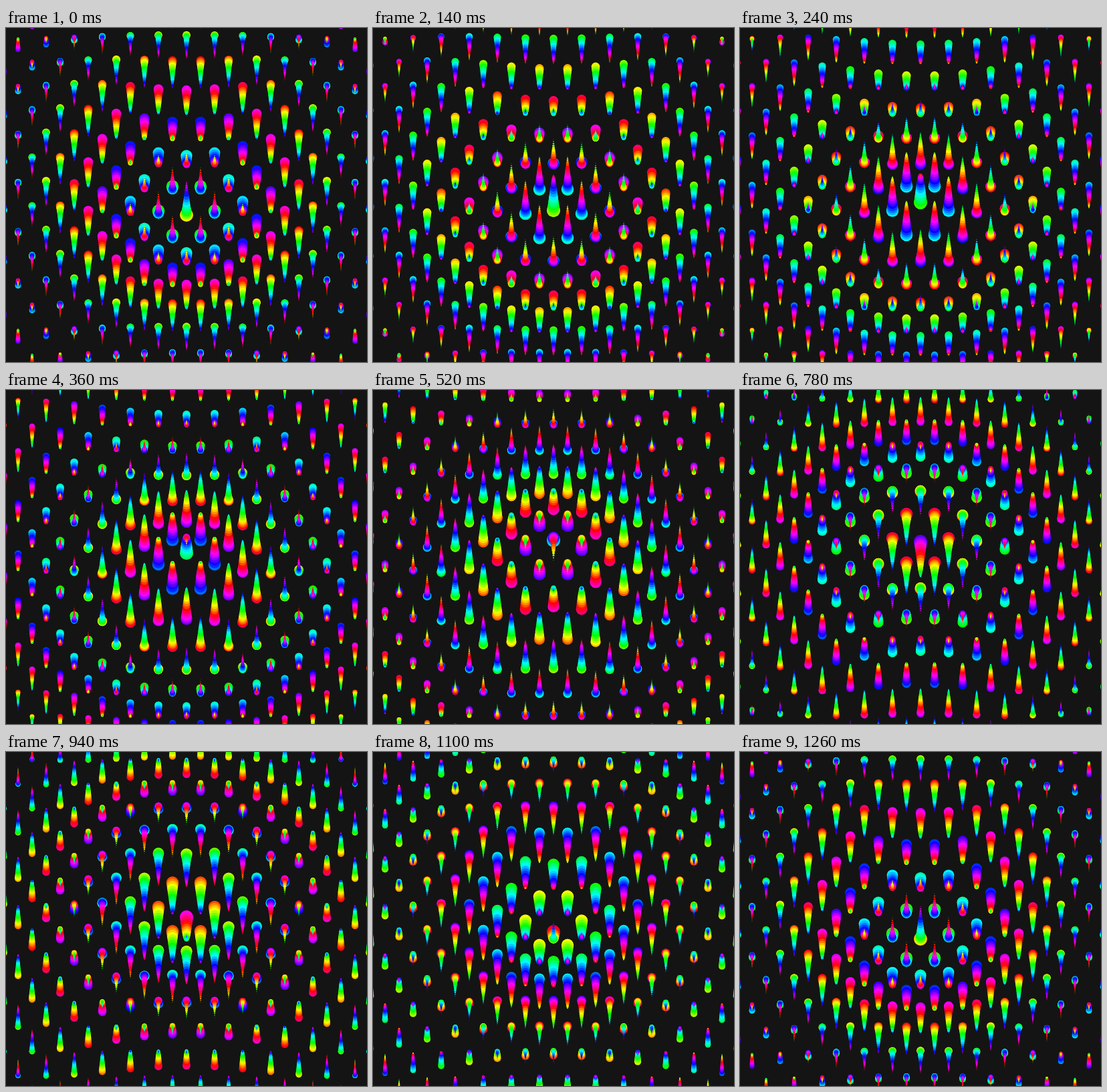
Write an HTML page with a canvas that moves like this. It is 540x500 px and loops after 1280 ms.

```html
<!DOCTYPE html>
<html>
<head>
<meta charset="utf-8">
<style>
html, body { margin: 0; width: 540px; height: 500px; overflow: hidden; background: #141414; }
canvas { display: block; }
</style>
</head>
<body>
<canvas id="stage" width="540" height="500"></canvas>
<script>
const ctx = document.getElementById('stage').getContext('2d');
const LOOP = 1280, STEP = 20;
const CX = 270, CY = 250, GAP = 42, ROW = GAP * Math.sqrt(3) / 2;
const FAR = Math.hypot(CX, CY);
const BEADS = 20;
const rad = deg => deg * Math.PI / 180;
const mix = (a, b, k) => a + (b - a) * k;

// A tapering chain of beads, each one a little ahead of the bead below it.
function drawChain(x, y, turn) {
  const dist = Math.hypot(x - CX, y - CY);
  const swing = mix(30, 15, dist / FAR);
  const size = mix(10, 3, dist / FAR);
  for (let i = 0; i < BEADS; i++) {
    const phase = turn - 0.815 * dist + 7 * i;
    const hue = turn + 40 + 1.75 * dist + 15 * i;
    ctx.fillStyle = `hsl(${hue % 360}, 100%, 50%)`;
    ctx.beginPath();
    ctx.arc(x, y + swing * Math.cos(rad(phase)), size * (1 - i / BEADS), 0, 2 * Math.PI);
    ctx.fill();
  }
}

function draw(ms) {
  const turn = Math.floor(ms % LOOP / STEP) * STEP / LOOP * 360;
  ctx.fillStyle = '#141414';
  ctx.fillRect(0, 0, 540, 500);
  for (let row = -8; row <= 8; row++) {
    const shift = row % 2 ? GAP / 2 : 0;
    for (let col = -7; col <= 7; col++) {
      drawChain(CX + col * GAP + shift, CY + row * ROW, turn);
    }
  }
}

const start = performance.now();
function tick() {
  draw(performance.now() - start);
  requestAnimationFrame(tick);
}
tick();
</script>
</body>
</html>
```
